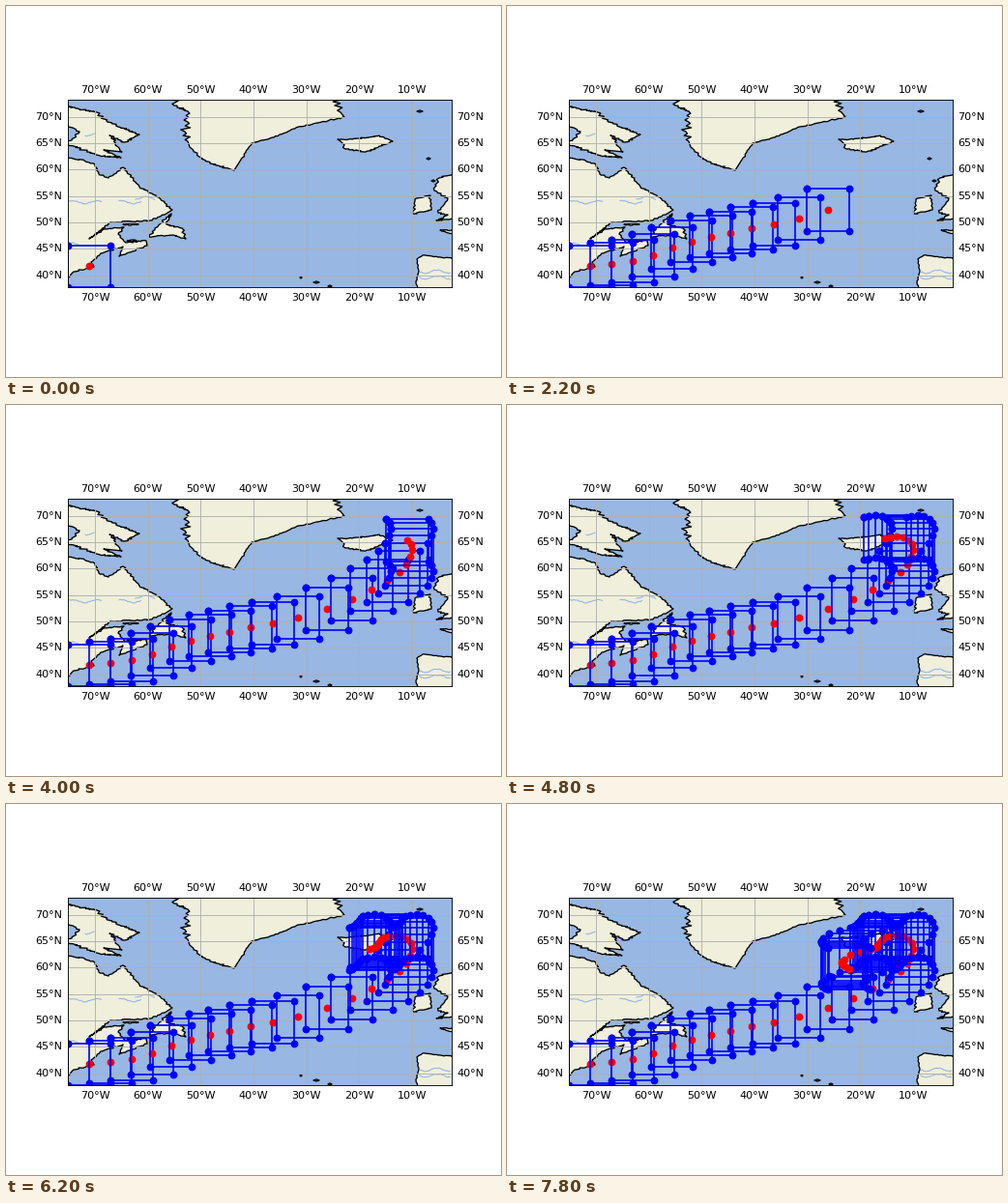
Write a matplotlib script that moves like this. It is 512 px wide and 384 px high and loops after 8000 ms.

```python
import random

import matplotlib.pyplot as plt
import numpy as np
from matplotlib.animation import FuncAnimation

W, H, DPI = 512, 384, 80
LEFT, RIGHT, TOP, BOTTOM = 64.0, 460.8, 97.4, 291.3
DEG = 5.467            # pixels per degree
HALF = 4 * DEG         # half the side of a search box
STEPS = 40
SEA, LAND, GRID = "#98b7e2", "#efefdb", "#b0b0b0"

rng = random.Random(4)


def lon_x(lon):
    return 420.1 + (lon + 10) * DEG


def lat_y(lat):
    return 114.7 + (70 - lat) * DEG


def coast(amp, pts, step=2.2):
    """Join key points by a shore whose inlets run mostly east and west."""
    out, side = [], 1
    for (x0, y0), (x1, y1) in zip(pts, pts[1:]):
        n = max(1, round(np.hypot(x1 - x0, y1 - y0) / step))
        out.append((x0, y0))
        for t in np.arange(1, n) / n:
            side = -side
            out.append((x0 + (x1 - x0) * t + side * rng.uniform(0, amp),
                        y0 + (y1 - y0) * t + rng.uniform(-0.6, 0.6)))
    return out + [pts[-1]]


def glide(keys):
    """Smooth curve through (step, x, y) keys, sampled at every step."""
    t, *axes = np.array(keys, float).T
    n = np.arange(STEPS)
    i = np.clip(np.searchsorted(t, n, "right") - 1, 0, len(t) - 2)
    h = t[i + 1] - t[i]
    u = (n - t[i]) / h
    curves = []
    for v in axes:
        m = np.gradient(v, t)
        ease = u * u * (3 - 2 * u)
        curves.append(v[i] + (v[i + 1] - v[i]) * ease
                      + h * u * (1 - u) * ((1 - u) * m[i] - u * m[i + 1]))
    return list(zip(*curves))


def make_lands():
    baffin = (coast(2.5, [(58, 102), (72, 106), (94, 110), (104, 119), (116, 125),
                          (138, 133), (122, 141), (107, 134), (116, 146), (120, 151)])
              + coast(2, [(101, 149), (119, 157), (97, 155), (80, 149), (58, 141)])
              + coast(1.5, [(68, 139), (76, 130), (58, 121)]))
    mainland = (coast(1.5, [(58, 156), (81, 160), (92, 164), (96, 174), (106, 178),
                            (121, 167), (138, 187), (158, 198), (172, 211)])
                + coast(1.2, [(164, 216), (149, 222), (108, 224), (86, 241), (101, 231),
                              (122, 229), (116, 236), (124, 245), (145, 243)])
                + coast(1, [(146, 248), (117, 259), (121, 249), (98, 256), (88, 265),
                            (91, 270), (70, 275), (58, 288)]))
    greenland = (coast(5, [(172, 90), (174, 103), (188, 109), (188, 120), (185, 130),
                           (188, 140)])
                 + coast(2, [(190, 146), (200, 156), (211, 163), (236, 170)])
                 + coast(1, [(243, 159), (254, 142), (277, 136), (300, 126), (350, 115)])
                 + coast(7, [(346, 110), (345, 97), (345, 90)]))
    iceland = coast(1.8, [(343, 138), (358, 138), (386, 134), (400, 140), (372, 151),
                          (351, 148), (348, 142), (343, 138)])
    newfoundland = coast(1.8, [(148, 239), (160, 225), (171, 215), (166, 226), (182, 230),
                               (186, 241), (173, 237), (148, 239)])
    ireland = coast(1.8, [(423, 200), (439, 196), (440, 211), (421, 215), (423, 200)])
    britain = coast(2, [(468, 173), (448, 178), (443, 191), (457, 199), (452, 207),
                        (447, 214), (457, 216), (445, 222), (468, 220)])
    brittany = coast(1.2, [(468, 232), (449, 232), (468, 238)])
    iberia = coast(0.8, [(468, 261), (447, 260), (431, 258), (425, 262), (427, 275),
                         (424, 285), (428, 298)]) + [(468, 298)]
    islands = [coast(1, [(x - r, y), (x, y - 1), (x + r, y), (x, y + 1), (x - r, y)])
               for x, y, r in [(129, 226, 8), (130, 243, 5), (442, 181, 2), (428, 109, 3),
                               (437, 158, 2), (305, 281, 1), (321, 286, 3), (335, 290, 2)]]
    return [baffin, mainland, greenland, iceland, newfoundland, ireland, britain,
            brittany, iberia, *islands]


def river(x0, x1, y):
    x = np.arange(x0, x1, 1.5)
    return x, y + 1.6 * np.sin(x / 4) + [rng.uniform(-0.6, 0.6) for _ in x]


def label(text, xy, shift, ha, va):
    ax.annotate(text, xy, xytext=shift, textcoords="offset points", ha=ha, va=va,
                fontsize=10, family="DejaVu Sans", annotation_clip=False)


def draw_map():
    for pts in make_lands():
        ax.fill(*zip(*pts), fc=LAND, ec="black", lw=1.2, joinstyle="round", zorder=1)
    for span in [(82, 92, 133), (64, 100, 203), (117, 141, 203), (134, 155, 199),
                 (64, 88, 247), (428, 461, 275), (428, 461, 281)]:
        ax.plot(*river(*span), color=SEA, lw=1, zorder=1.1)


def draw_grid():
    for lon in range(-70, 0, 10):
        x, text = lon_x(lon), f"{-lon}°W"
        ax.axvline(x, color=GRID, lw=0.8, zorder=1.5)
        label(text, (x, TOP), (0, 5), "center", "bottom")
        label(text, (x, BOTTOM), (0, -5), "center", "top")
    for lat in range(40, 75, 5):
        y, text = lat_y(lat), f"{lat}°N"
        ax.axhline(y, color=GRID, lw=0.8, zorder=1.5)
        label(text, (LEFT, y), (-5, 0), "right", "center")
        label(text, (RIGHT, y), (5, 0), "left", "center")


def add_stop(x, y):
    dot, = ax.plot([x], [y], "o", color="red")
    xs = x + HALF * np.array([-1, 1, 1, -1, -1])
    ys = y + HALF * np.array([-1, -1, 1, 1, -1])
    box, = ax.plot(xs, ys, "o-", color="blue")
    return dot, box


# The first box sits in the corner of the map.
track = glide([
    (0, LEFT + HALF, BOTTOM - HALF), (2, 130.3, 264.2), (5, 190.5, 243.5),
    (8, 253.3, 230.2), (10, 302, 220), (11, 332.2, 211), (13, 378.2, 191),
    (15, 406.5, 173), (17, 418.2, 157), (19, 418.5, 144.3), (21, 409.5, 137),
    (24, 391, 138.2), (26, 386.8, 142.5), (30, 379.8, 149), (31, 376.4, 150.2),
    (33, 355, 156.2), (34, 348.8, 161), (36, 346.4, 165), (39, 353.8, 170.6)])

fig = plt.figure(figsize=(W / DPI, H / DPI), dpi=DPI, facecolor="white")
ax = fig.add_axes([LEFT / W, 1 - BOTTOM / H, (RIGHT - LEFT) / W, (BOTTOM - TOP) / H],
                  facecolor=SEA)
ax.set(xlim=(LEFT, RIGHT), ylim=(BOTTOM, TOP), xticks=[], yticks=[])
draw_map()
draw_grid()
stops = [add_stop(x, y) for x, y in track]


def update(n):
    for i, stop in enumerate(stops):
        for artist in stop:
            artist.set_visible(i <= n)
    return [artist for stop in stops for artist in stop]


anim = FuncAnimation(fig, update, frames=STEPS, interval=200,
                     init_func=lambda: update(0), repeat=True, blit=False)
plt.show()
```
